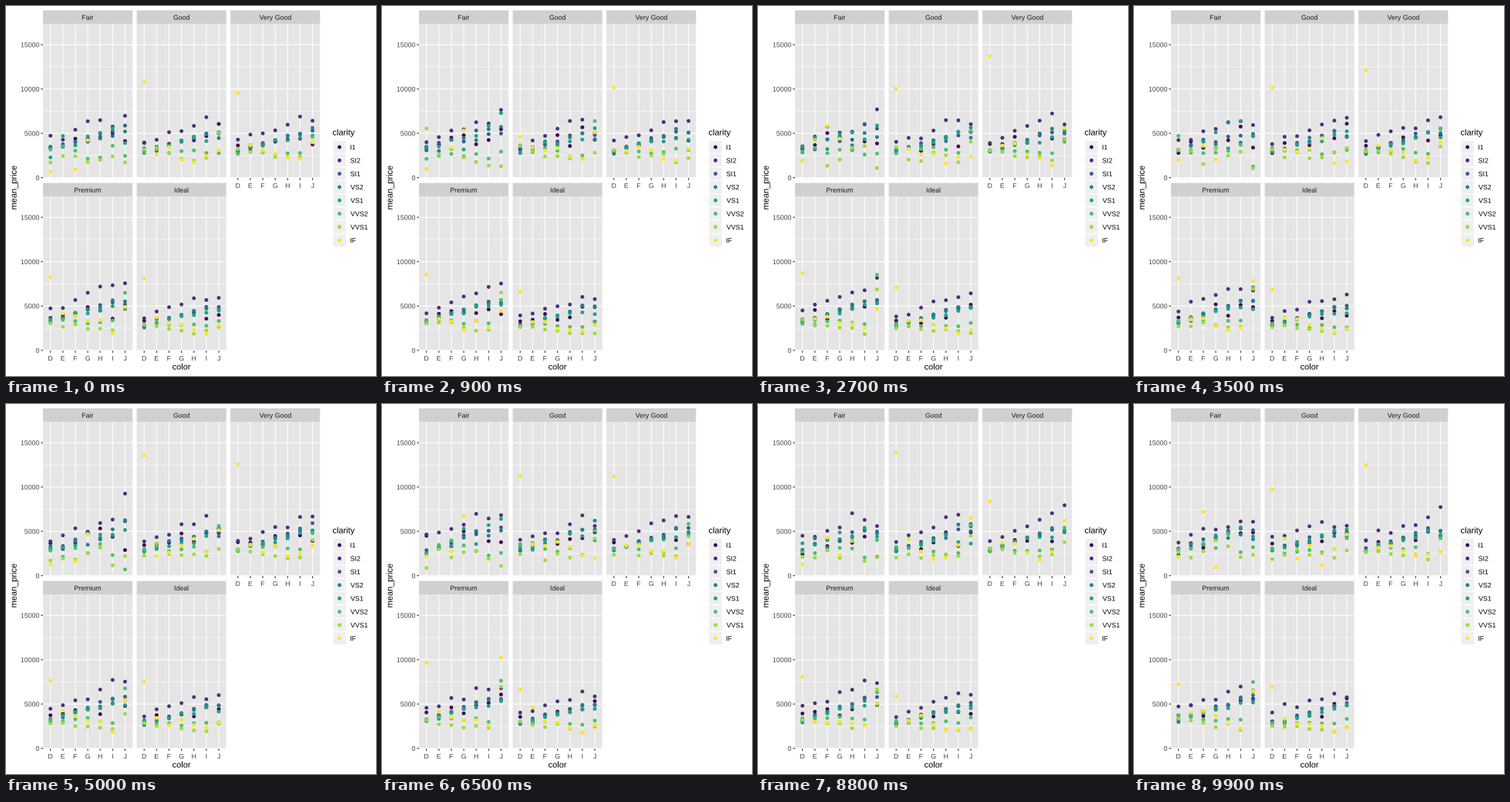
These frames come from a looping animation (480 by 480 pixels, 10000 ms). A matplotlib script:

```python
import numpy as np
import matplotlib.pyplot as plt
from matplotlib.animation import FuncAnimation
from matplotlib.patches import PathPatch, Rectangle
from matplotlib.textpath import TextPath
from matplotlib.transforms import Affine2D

SIZE, DPI = 480, 96
PT = 72 / DPI  # points per pixel
FRAMES, STEP = 100, 100

CUTS = ["Fair", "Good", "Very Good", "Premium", "Ideal"]
COLORS = "DEFGHIJ"
CLARITY = ["I1", "SI2", "SI1", "VS2", "VS1", "VVS2", "VVS1", "IF"]
SHADES = plt.get_cmap("viridis")(np.linspace(0, 1, len(CLARITY)))

# Panel layout in pixels
LEFT, TOP, WIDTH, HEIGHT = 48, 23, 116.1, 200.2
COL_STEP, ROW_STEP = 121.6, 224
STRIP = 17.4
ZERO, PER_5000 = 199.7, 57.5
UNIT = WIDTH / 7.2
DOT = (4.9 * PT) ** 2

# Axes of the price model: cut, color, clarity
CUT, COLOR, GRADE = np.ogrid[:5, :7, :8]


def corner(i):
    return LEFT + i % 3 * COL_STEP, TOP + i // 3 * ROW_STEP


def column(x0, k):
    return x0 + (0.6 + k) * UNIT


def price_y(y0, price):
    return y0 + ZERO - price * PER_5000 / 5000


def mean_prices():
    """Price rises towards J for low clarity and falls for high clarity."""
    start = np.array([3300, 4000, 2950, 2800, 3000, 3050, 2800, 3900])
    slope = np.array([220, 480, 420, 440, 310, -30, -150, -350])
    level = np.array([1.05, 1, 1.02, 1.1, 0.96])
    rare_j = np.array([0, 1700, 1500, 4000, 500])
    flawless_d = [1800, 10000, 10300, 9100, 6500]

    means = level[CUT] * (start[GRADE] + slope[GRADE] * np.minimum(COLOR, 5))
    means[:, 6, 5:] += rare_j[:, None]
    means[:, 0, 7] = flawless_d
    return means


def stone_counts():
    size = np.array([1600, 4900, 12100, 13800, 21600])
    gap = GRADE - (1.5 + 0.2 * CUT)
    rarity = np.exp(-np.where(gap < 0, -2 * gap, gap) / 1.25) / 2
    share = 0.2 - 0.012 * (COLOR - 2.4) ** 2
    return np.maximum(size[CUT] * rarity * share, 2)


# Fair flawless stones exist only in D, F and G
EXISTS = (CUT > 0) | (GRADE < 7) | np.isin(COLOR, [0, 2, 3])
CUT_ID, COLOR_ID, GRADE_ID = np.nonzero(EXISTS)
MEANS = mean_prices()[EXISTS]
SHAPES = stone_counts()[EXISTS] / 0.4
X0, Y0 = corner(CUT_ID)
XS = column(X0, COLOR_ID)


def resample(frame):
    """Mean price of every cell in one bootstrap sample."""
    rng = np.random.default_rng(4100 + frame)
    return np.clip(rng.gamma(SHAPES, MEANS / SHAPES), 700, 15200)


fig = plt.figure(figsize=(SIZE / DPI, SIZE / DPI), dpi=DPI, facecolor="white")
ax = fig.add_axes([0, 0, 1, 1])
ax.set(xlim=(0, SIZE), ylim=(SIZE, 0))
ax.axis("off")


def box(x, y, w, h, color, border=0):
    ax.add_patch(Rectangle((x, y), w, h, facecolor=color, edgecolor="white",
                           linewidth=border * PT, snap=False, zorder=1))


def line(xs, ys, color="white", width=1.07):
    ax.plot(xs, ys, color=color, lw=width * PT, solid_capstyle="butt",
            snap=False, zorder=2)


def label(x, y, text, size=8.8, color="black", align=0.5, turn=0):
    """Text as outlines, so that letters keep their natural spacing."""
    path = TextPath((0, 0), text, size=size, prop={"family": "Liberation Sans"})
    ext = path.get_extents()
    shift = Affine2D().translate(-ext.x0 - align * ext.width, 0)
    place = shift.scale(1, -1).rotate_deg(-turn).translate(x, y)
    ax.add_patch(PathPatch(path, facecolor=color, linewidth=0, snap=False,
                           transform=place + ax.transData, zorder=4))


def draw_panel(i, cut):
    x0, y0 = corner(i)
    right, bottom = x0 + WIDTH, y0 + HEIGHT
    box(x0, y0 - STRIP, WIDTH, STRIP, "#d0d0d0")
    label(x0 + WIDTH / 2, y0 - 5.2, cut, color="#1a1a1a")
    box(x0, y0, WIDTH, HEIGHT, "#e5e5e5")
    for price in (2500, 7500, 12500):
        line((x0, right), [price_y(y0, price)] * 2, width=0.53)
    for price in (0, 5000, 10000, 15000):
        y = price_y(y0, price)
        line((x0, right), (y, y))
        if i % 3 == 0:
            line((x0 - 2.75, x0), (y, y), "#333333")
            label(x0 - 5, y + 3.2, str(price), color="#444444", align=1)
    for k, color in enumerate(COLORS):
        x = column(x0, k)
        line((x, x), (y0, bottom))
        if i >= 2:
            line((x, x), (bottom, bottom + 2.75), "#333333")
            label(x, bottom + 12.9, color, color="#444444")


def draw_legend():
    key = 17.28
    label(424, 167.6, "clarity", 11, align=0)
    for j, name in enumerate(CLARITY):
        y = 174.4 + key * j
        box(424, y, key, key, "#efefef", border=1.07)
        label(447, y + key / 2 + 3.2, name, align=0)
    ys = 174.4 + key * (np.arange(len(CLARITY)) + 0.5)
    ax.scatter(np.full(len(ys), 424 + key / 2), ys, s=DOT, c=SHADES,
               linewidths=0, zorder=3)


for i, cut in enumerate(CUTS):
    draw_panel(i, cut)
draw_legend()
label(227.7, 471.6, "color", 11)
label(13.6, 235.5, "mean_price", 11, turn=90)

dots = ax.scatter(XS, Y0, s=DOT, c=SHADES[GRADE_ID], linewidths=0, zorder=3)


def update(frame):
    dots.set_offsets(np.column_stack([XS, price_y(Y0, resample(frame))]))
    return (dots,)


anim = FuncAnimation(fig, update, frames=FRAMES, interval=STEP, repeat=True, repeat_delay=0)
plt.show()
```
